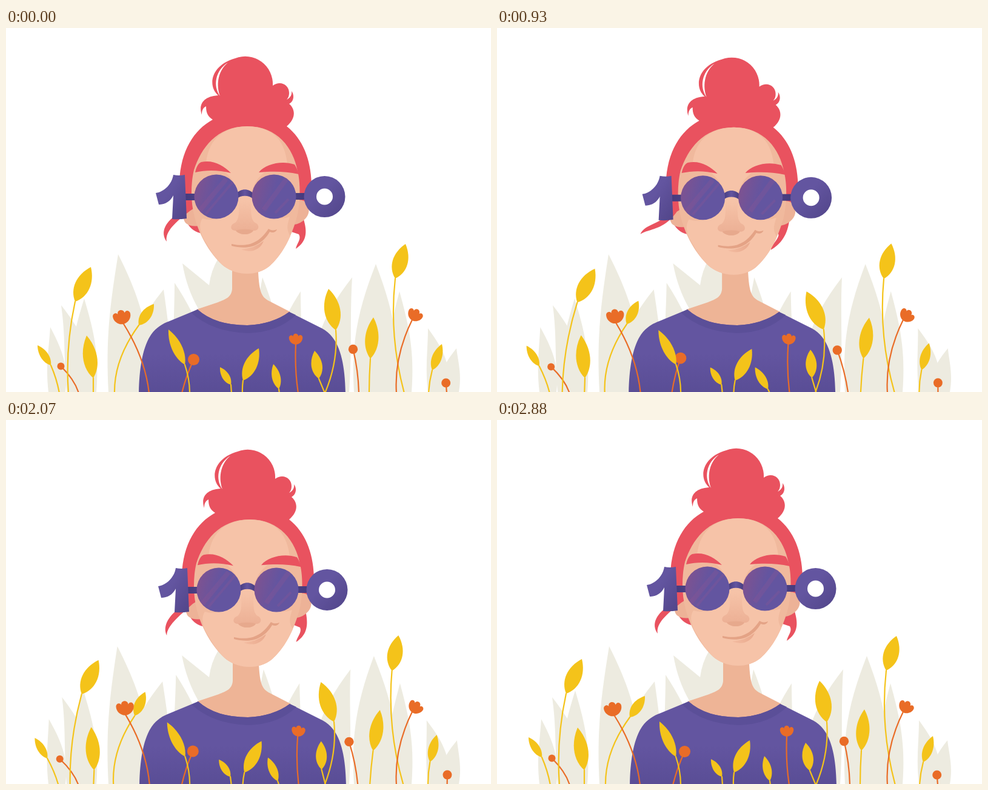
An HTML page for the animation above (2.91 s loop, 800 by 600 pixels).

```html
<!DOCTYPE html>
<html lang="en">
<head>
<meta charset="utf-8">
<title>Portrait in a meadow</title>
<style>
  html, body { margin: 0; width: 100%; height: 100%; overflow: hidden; background: #fff; }
  svg { display: block; width: 800px; height: 600px; }
</style>
</head>
<body>
<svg viewBox="0 0 800 600">
  <defs>
    <linearGradient id="cloth" x2="0" y2="1">
      <stop offset=".5" stop-color="#6355a0"/><stop offset="1" stop-color="#584c94"/>
    </linearGradient>
    <linearGradient id="frame" x2="1" y2="1">
      <stop offset=".4" stop-color="#6355a0"/><stop offset="1" stop-color="#514589"/>
    </linearGradient>
    <linearGradient id="lens" y1=".3" x2="1" y2=".6">
      <stop offset="0" stop-color="#7f5290"/><stop offset=".5" stop-color="#6355a0"/>
    </linearGradient>
    <linearGradient id="bar">
      <stop offset="0" stop-color="#453a7c"/><stop offset=".5" stop-color="#6355a0"/><stop offset="1" stop-color="#453a7c"/>
    </linearGradient>
    <linearGradient id="nose" x2="0" y2="1">
      <stop offset="0" stop-color="#f6c3a8"/><stop offset="1" stop-color="#ebae93"/>
    </linearGradient>
    <linearGradient id="lip">
      <stop offset="0" stop-color="#f3bca1"/><stop offset="1" stop-color="#e9a98d"/>
    </linearGradient>
    <clipPath id="glass"><circle cx="347" cy="278" r="36.5"/><circle cx="442" cy="278" r="36.5"/></clipPath>
  </defs>

  <g id="back" fill="#edebe0"></g>

  <g id="body">
    <path fill="#eeb496" d="M373 390V430C372 444 362 447 350 452L314 464Q345 495 400 494Q445 493 469 468L434 450C421 443 417 436 415.500 390Z"/>
    <path fill="url(#cloth)" d="M219 610C219 560 226 512 250 494C256 489 262 486 270 483L316 464Q345 490 398 490Q440 488 467 468L521 495C550 510 560 550 560 610Z"/>
    <path fill="#5b4f98" d="M316 464Q345 490 398 490Q440 488 467 468L478 473Q448 502 398 503Q340 501 305 469Z"/>
  </g>

  <g id="head">
    <g fill="#e9525f">
      <path id="lockR"/>
      <path d="M296 316Q304 334 320 338L325 320Z"/>
      <path d="M286 254C288 202 310 168 341 151C333 146 330 140 330 129C324 132 323 137 323 143C318 129 322 113 350 111C333 97 336 62 378 50A45.500 45.500 0 0 1 440 95C452 86 467 93 467 107C467 111 466 115 463 118C469 115 472 110 471 104C476 110 475 121 467 125C478 134 478 150 463 162C491 184 504 220 504 262V290L480 318L450 240L330 230L310 300H290Z"/>
    </g>
    <path fill="#fff" d="M366 57C345 70 341 96 353 112C347 96 348 72 366 57Z"/>
    <path fill="#edb297" d="M312 283C293 283 288 314 297 322Q305 328 318 326ZM480 284C500 280 505 303 494 314Q487 322 476 324Z"/>
    <path id="lockL" fill="#e9525f"/>
    <path fill="#f0b99d" d="M398 162C347 162 322 198 310 234C305 255 304 285 311 312C320 345 339 376 360 393C382 409 414 409 434 393C456 374 470 345 479 315C486 290 486 255 481 236C474 198 448 162 398 162Z"/>
    <path fill="#f6c3a8" d="M398 162C352 163 333 190 330 223C350 224 378 245 384 276Q391 290 404 276C408 252 426 228 464 223C460 190 445 163 398 162Z"/>
    <path fill="#f6c3a8" d="M324 314C316 326 322 342 330 354C340 372 350 385 360 393C382 409 414 409 434 393C450 379 461 361 469 343C461 330 465 322 468 311Q440 322 410 296L404 274H384L378 296Q352 322 324 314Z"/>
    <path fill="url(#nose)" d="M384 284C385 306 384 316 378 321C369 324 369 334 379 334C386 342 402 342 408 334C418 335 419 324 411 321C404 316 404 306 404 284Z"/>
    <path fill="#e7a98d" d="M379 334C386 331 402 331 408 334C402 342 386 342 379 334Z"/>
    <path fill="url(#lip)" d="M388 365C403 371 419 367 425 351Q410 363 388 365Z"/>
    <path fill="#e4a386" d="M372 356C396 361 416 357 433 331C437 334 442 334 447 332C445 337 440 338 435 336C419 363 395 365 372 359Z"/>
    <path id="brows" fill="#e9525f" d="M312 238C314 229 317 223 322 221C342 217 358 226 371 239C350 234 330 234 312 238ZM417 238C428 224 455 218 476 225Q480 231 483 241C460 236 440 236 417 238Z"/>
    <path fill="url(#bar)" d="M292 273H313V284H292ZM476 272H495V283H476Z"/>
    <path fill="url(#bar)" d="M380 273C387 264 401 264 408 273V282C401 275 387 275 380 282Z"/>
    <path fill="url(#frame)" d="M276 242Q286 244 295 242L298 314Q286 316 274 315L276 276C271 286 262 291 252 291L247 272C262 270 274 256 276 242Z"/>
    <path fill="url(#frame)" fill-rule="evenodd" d="M491.500 278a34 34 0 1 1 68 0a34 34 0 1 1-68 0ZM512 278a13.500 13.500 0 1 0 27 0a13.500 13.500 0 1 0-27 0Z"/>
    <circle cx="347" cy="278" r="36.500" fill="url(#lens)"/>
    <circle cx="442" cy="278" r="36.500" fill="url(#lens)"/>
    <g clip-path="url(#glass)" stroke="#a4558c" stroke-opacity=".18" fill="none">
      <path stroke-width="8" d="M318 303L363 249M425 300L464 247"/>
      <path stroke-width="4" d="M330 306L374 254M444 305L466 282"/>
    </g>
  </g>

  <g id="front" stroke-linecap="round"></g>
</svg>

<script>
const $ = id => document.getElementById(id);
const LOOP = 2910, STEP = 30, GROUND = 602;
const YELLOW = '#f4c31a', ORANGE = '#e96c27';
const times = [0, 660, 1230, 1590, 2070, 2310, LOOP - STEP];

// Smooth cyclic curve through a few poses, at rest at both ends
function cycle(...poses) {
  const v = [0, ...poses, 0], n = 6;
  const span = i => times[i + 1] - times[i];
  const slope = i => (v[i + 1] - v[i]) / span(i);
  const tangent = k => {
    const a = (k + n - 1) % n, b = k % n;
    return (slope(a) * span(b) + slope(b) * span(a)) / (span(a) + span(b));
  };
  return t => {
    const i = Math.min(n, times.findIndex(end => end > t) + 6 * (t >= times[n]) + (t >= times[n])) - 1;
    const h = span(i), s = (t - times[i]) / h, r = 1 - s;
    return v[i] * r * r * (1 + 2 * s) + v[i + 1] * s * s * (3 - 2 * s)
      + h * s * r * (tangent(i) * r - tangent(i + 1) * s);
  };
}

const nod = cycle(-5, -7, 3, 4, 7);
const trail = cycle(1, 1, .45, .2, .1);
const breeze = cycle(1, -.4, -.05, .45, 1);
const gust = cycle(1, .9, .75, .6, 1);
const bob = t => 2 * Math.abs(Math.sin(2 * Math.PI * t / (LOOP - STEP)));

// Pale leaf: left foot, right foot, tip, sway
function spear(left, right, x, y, sway) {
  const at = k => 600 - k * (600 - y);
  return t => {
    const d = sway * breeze(t);
    const side = foot => foot + (x - foot) * .2 + d * .6;
    return `<path d="M${left} 600C${left - 5} ${at(.4)} ${side(left)} ${at(.65)} ${x + d} ${y}`
      + `C${side(right)} ${at(.65)} ${right + 5} ${at(.4)} ${right} 600Z"/>`;
  };
}

// Stem that swings about its foot; top(x, y, t) draws what it carries
function stem(foot, x, y, bow, color, wind, sway, top) {
  return t => {
    const d = sway * wind(t);
    const fx = foot + d * .25, px = x + d, py = y + d * (x - foot) / (GROUND - y);
    return `<path d="M${fx} ${GROUND}Q${(fx + px) / 2 + bow} ${(GROUND + py) / 2} ${px} ${py}"`
      + ` fill="none" stroke="${color}" stroke-width="2.2"/>` + top(px, py, t);
  };
}

// (vx, vy) points from joint to tip; lean is how far the tip swings past the joint
function leaf(foot, x, y, vx, vy, width, bow, wind, sway, lean) {
  const len = Math.hypot(vx, vy), w = width * .667;
  return stem(foot, x, y, bow, YELLOW, wind, sway, (px, py, t) => {
    const turn = Math.asin((vx + lean * wind(t)) / len) * 180 / Math.PI;
    return `<path fill="${YELLOW}" transform="translate(${px} ${py}) rotate(${turn})"`
      + ` d="M0 0C${-w} ${-len * .25} ${-w} ${-len * .66} 0 ${-len}C${w} ${-len * .66} ${w} ${-len * .25} 0 0Z"/>`;
  });
}

function flower(foot, x, y, angle, size, bow, wind, sway, lean) {
  return stem(foot, x, y, bow, ORANGE, wind, sway, (px, py, t) =>
    `<path fill="${ORANGE}" transform="translate(${px} ${py}) rotate(${angle + lean * wind(t)}) scale(${size})"`
    + ' d="M0 1C-8 1-15-6-15-14C-15-20-8-21-6-17C-6-25 5-25 6-17C8-22 15-20 15-14C15-6 8 1 0 1Z"/>');
}

function berry(foot, x, y, r, bow, wind, sway) {
  return stem(foot, x, y, bow, ORANGE, wind, sway, (px, py) =>
    `<circle cx="${px}" cy="${py}" r="${r}" fill="${ORANGE}"/>`);
}

const meadow = [
  spear(70, 98, 73, 493, -5),
  spear(100, 140, 91, 457, 3),
  spear(108, 149, 129, 446, -3),
  spear(169, 235, 185, 373, -3),
  spear(200, 270, 260, 431, -4),
  spear(278, 330, 278, 420, 5),
  t => `<path d="M${291 - 2 * breeze(t)} 388L335 424Q338 400 350 380H385V450L318 464Q298 430 ${291 - 2 * breeze(t)} 388Z"/>`,
  spear(408, 455, 423, 411, 4),
  spear(440, 486, 486, 434, -4),
  spear(507, 566, 571, 411, -6),
  spear(574, 645, 610, 389, -7),
  spear(630, 669, 649, 434, 2),
  spear(696, 730, 696, 495, -5),
  spear(718, 747, 743, 528, 2)
];

const plants = [
  leaf(88, 74, 556, -22, -33, 13, 3, breeze, -13, 3),
  berry(120, 90.5, 557.5, 6, 8, breeze, -4),
  leaf(103, 114, 451, 26, -57, 25, -11, gust, 18, 3),
  leaf(144, 144, 577, -11, -70, 23, 0, breeze, 3, 14),
  leaf(179, 219, 490, 25, -35, 17, -21, breeze, -15, -17),
  flower(236, 193.5, 487, -12, .98, 15, breeze, 8, 18),
  berry(290, 309.5, 546.5, 9.5, -3, trail, -6),
  leaf(303, 295, 555, -27, -58, 17, 4, breeze, 1, -6),
  leaf(372, 371, 588, -18, -29, 12, 0, breeze, -2, -2),
  leaf(390, 391, 581, 26, -53, 21, -1, breeze, 5, 5),
  leaf(451, 450, 595, -9, -41, 14, 0, gust, -3, -12),
  flower(482, 478, 521, 0, .75, -4, breeze, 7, 17),
  leaf(526, 516, 578, -7, -46, 18, 0, breeze, 10, 14),
  leaf(526, 544, 498, -12, -68, 26, 13, gust, -5, -16),
  berry(582, 572.5, 529.5, 7.7, 4, gust, -11),
  leaf(599, 601, 545, 5, -68, 22, -1, breeze, 10, 14),
  leaf(657, 642, 413, 17, -57, 25, -18, breeze, -12, -14),
  flower(644, 670, 481, 30, .85, -17, gust, 0, 10),
  leaf(697, 703, 564, 16, -43, 16, -2, breeze, -8, -11),
  berry(727, 725.7, 585, 7.5, 0, breeze, 5)
];

const move = (id, x, y) => $(id).setAttribute('transform', `translate(${x} ${y})`);

// Loose hair lags behind the head and straightens as it swings out
function drawLocks(t) {
  const d = trail(t), x = 265 - 19 * d, y = 352 - 8 * d + .7 * nod(t);
  $('lockL').setAttribute('d', `M288 304C${262 + 13 * d} ${318 + 4 * d} ${254 - 2 * d} ${y - 15 - 2 * d} ${x} ${y}`
    + `C${262 - 4 * d} ${y - 17 + 7 * d} ${280 + 2 * d} ${320 + 11 * d} 304 301L312 296V282H290Z`);
  const rx = 478 - 17 * d;
  $('lockR').setAttribute('d', `M490 312C${496 - 8 * d} ${332 + 7 * d} ${499 - 21 * d} ${350 + 4 * d} ${rx} 364`
    + `C${rx + 1} 356 ${488 - 16 * d} 348 ${483 - 10 * d} 340L471 336L480 310Z`);
}

function draw(now) {
  const t = Math.floor(now % LOOP / STEP) * STEP;
  const render = parts => parts.map(part => part(t)).join('');
  $('back').innerHTML = render(meadow);
  $('front').innerHTML = render(plants);
  move('body', nod(t) * .25, 0);
  move('head', nod(t), bob(t));
  move('brows', 0, -bob(t) * .4);
  drawLocks(t);
}

const start = performance.now();
(function tick() {
  draw(performance.now() - start);
  requestAnimationFrame(tick);
})();
</script>
</body>
</html>
```
